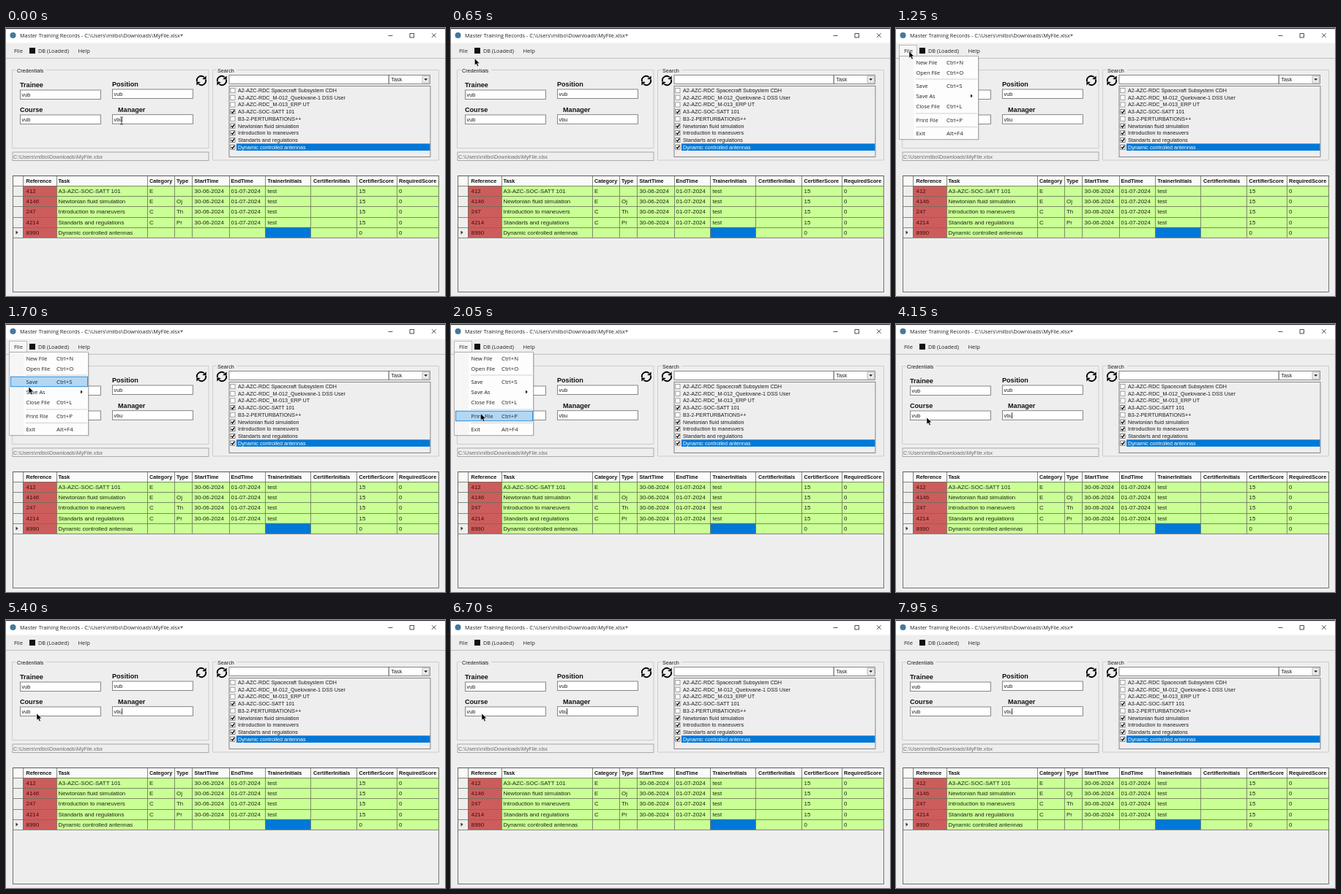
Write an HTML page that moves like this. It is 600 by 367 pixels and loops after 8 s.

```html
<!DOCTYPE html>
<html lang="en">
<head>
<meta charset="utf-8">
<title>Master Training Records</title>
<style>
html, body { margin: 0; width: 100%; height: 100%; overflow: hidden; background: #efeeef; }
svg { display: block; width: 600px; height: 367px; }
text { font-family: "Liberation Sans", Arial, sans-serif; white-space: pre; }
.ui { font-family: "Open Sans", "Noto Sans", sans-serif; }
.bold { font-weight: 700; }
</style>
</head>
<body>
<svg id="stage" viewBox="0 0 600 367" xmlns="http://www.w3.org/2000/svg"></svg>
<script>
const PATH = 'C:\\Users\\milbo\\Downloads\\MyFile.xlsx';
const BLUE = '#0078d7', FORM = '#efeeef', EDGE = '#6c6c6c';

const rect = (x, y, w, h, fill, stroke = 'none', extra = '') =>
  `<rect x="${x}" y="${y}" width="${w}" height="${h}" fill="${fill}" stroke="${stroke}" stroke-width=".8" ${extra}/>`;
const text = (x, y, s, size, fill = '#1c1c1c', cls = '') =>
  `<text x="${x}" y="${y}" font-size="${size}" fill="${fill}" class="${cls}">${s}</text>`;
const path = (d, stroke, width = .8, fill = 'none') =>
  `<path d="${d}" stroke="${stroke}" stroke-width="${width}" fill="${fill}"/>`;

function titleAndMenuBar() {
  return rect(0, 0, 600, 20.5, '#fff') + rect(0, 0, 600, 1.2, '#2b2b33') +
    '<circle cx="9.5" cy="10" r="4" fill="#44789c"/>' +
    text(19, 13, `Master Training Records - ${PATH}*`, 7.3, '#222', 'ui') +
    path('M522.5 10.5h6M552 7.5h5.5v5.5h-5.5zM582 7.3l5.6 5.6M587.6 7.3l-5.6 5.6', '#222') +
    rect(32, 27, 8, 8, '#111') +
    text(44, 33.5, 'DB (Loaded)', 7.35, '#222', 'ui') +
    text(98.5, 33.5, 'Help', 7.6, '#222', 'ui') +
    path('M0 41.5H600', '#b4b4b4');
}

function group(x, y, w, h, caption, captionWidth) {
  return path(`M${x + 5} ${y}H${x}V${y + h}H${x + w}V${y}H${x + captionWidth + 8}`, '#c4c4c4') +
    text(x + 6.5, y + 3.3, caption, 7.2);
}

function field(x, y, labelX, label, value) {
  return text(labelX, y - 3.6, label, 9.1, '#111', 'bold') +
    rect(x, y, 110, 12.5, '#fff', EDGE) +
    text(x + 2, y + 9, value, 7.3);
}

function refreshIcon(x, y) {
  const half = path('M-6 1.2A6 6 0 0 1 3.6 -4.8', '#000', 1.9) +
    path('M6.6 -6.6V-1.4L1.2 -2Z', 'none', 0, '#000');
  return `<g transform="translate(${x} ${y})">${half}<g transform="rotate(180)">${half}</g></g>`;
}

function credentials() {
  return group(8.5, 57.5, 268.5, 107, 'Credentials', 38) +
    field(19.5, 85, 19, 'Trainee', 'vub') + field(145.5, 84, 145, 'Position', 'vub') +
    field(19.5, 119, 19, 'Course', 'vub') + field(145.5, 118.7, 153, 'Manager', 'vbu') +
    refreshIcon(267, 72) +
    rect(9, 170, 268, 11.5, FORM, '#999') + text(10, 178.5, PATH, 7.2, '#6d6d6d');
}

function search() {
  const items = [
    'A2-AZC-RDC Spacecraft Subsystem CDH', 'A2-AZC-RDC_M-012_Quelovane-1 DSS User',
    'A2-AZC-RDC_M-013_ERP UT', 'A3-AZC-SOC-SATT 101', 'B3-2-PERTURBATIONS++',
    'Newtonian fluid simulation', 'Introduction to maneuvers',
    'Standarts and regulations', 'Dynamic controlled antennas'];
  const checked = [3, 5, 6, 7, 8];
  const rows = items.map((name, i) => {
    const y = 85.6 + i * 9.69, selected = i === 8, on = checked.includes(i);
    return (selected ? rect(315, y - 4.8, 264.5, 9.6, BLUE) : '') +
      rect(306.8, y - 3.1, 6.2, 6.2, '#fff', on ? '#666' : '#8c8c8c') +
      (on ? path(`M308 ${y}l1.6 1.8l2.6 -3.8`, '#000', 1.3) : '') +
      text(317, y + 2.5, name, 7.2, selected ? '#fff' : '#1c1c1c');
  });
  return group(282.5, 57.5, 309, 123.5, 'Search', 25) + refreshIcon(295, 72) +
    rect(305, 64.5, 218, 12, '#fff', EDGE) + rect(523.5, 64.5, 56, 12, '#fff', EDGE) +
    text(526.5, 73, 'Task', 7.2) + rect(569, 66, 9, 9, FORM, '#aaa') +
    path('M571.2 69.2h5l-2.5 2.8z', 'none', 0, '#222') +
    rect(305, 79.5, 275, 97, FORM, EDGE) + rows.join('');
}

function grid() {
  const edges = [9.5, 23.5, 69.5, 193.5, 230.5, 254.5, 305.5, 354.5, 416.5, 479.5, 534.5, 591.5];
  const textX = [27.5, 71.5, 196, 233, 257.5, 307.5, 357.5, 420, 482.5, 537];
  const heads = ['Reference', 'Task', 'Category', 'Type', 'StartTime', 'EndTime',
    'TrainerInitials', 'CertifierInitials', 'CertifierScore', 'RequiredScore'];
  const done = (id, task, category, type) =>
    [id, task, category, type, '30-06-2024', '01-07-2024', 'test', '', '15', '0'];
  const rows = [
    done('412', 'A3-AZC-SOC-SATT 101', 'E', ''),
    done('4146', 'Newtonian fluid simulation', 'E', 'Oj'),
    done('247', 'Introduction to maneuvers', 'C', 'Th'),
    done('4214', 'Standarts and regulations', 'C', 'Pr'),
    ['8990', 'Dynamic controlled antennas', '', '', '', '', '', '', '0', '0']];
  const top = 216, step = 14.2, bottom = top + 5 * step;
  const lines = edges.map(x => `M${x} 202.5V${bottom}`).join('') +
    [0, 1, 2, 3, 4, 5].map(i => `M9.5 ${Math.round(top + i * step) + .5}H591.5`).join('');
  return rect(9.5, 202.5, 582, 159, FORM, '#555') + rect(10, 203, 581, top - 203, '#fafafa') +
    rect(23, top, 46, bottom - top, '#cd5c5c') + rect(69, top, 522.5, bottom - top, '#caff96') +
    rect(354.5, bottom - step, 62, step, BLUE) +
    path(lines, '#66705a', .8) + path('M9 202.5H592', '#555') +
    path(`M13.5 ${bottom - 9.6}v5l3 -2.5z`, 'none', 0, '#333') +
    heads.map((s, c) => text(textX[c], 212.3, s, 7.2, '#111', 'bold')).join('') +
    rows.map((row, r) => row.map((s, c) =>
      s && text(textX[c], top + r * step + 10, s, 7.9, c ? '#1c2414' : '#3c1010')).join('')).join('');
}

const menuItems = [
  ['New File', 'Ctrl+N', 47], ['Open File', 'Ctrl+O', 61], ['Save', 'Ctrl+S', 79],
  ['Save As', '', 93], ['Close File', 'Ctrl+L', 107], ['Print File', 'Ctrl+P', 126],
  ['Exit', 'Alt+F4', 144]];

function dropdown() {
  return rect(6, 40, 108, 113.5, '#000', 'none', 'opacity=".12"') +
    rect(4.5, 38.5, 108, 114, '#fdfdfd', '#a0a0a0') + rect(5.2, 39.2, 19, 112.6, '#f6f6f6') +
    path('M27 70H111M27 117H111M27 135.5H111', '#c4c4c4') +
    rect(6.5, 0, 105, 13.6, '#b3d7f3', BLUE, 'id="highlight"') +
    menuItems.map(([name, key, y]) =>
      text(27.5, y + 2.8, name, 7.4, '#222', 'ui') + text(69, y + 2.8, key, 7.8, '#222', 'ui')).join('') +
    path('M102 90.5v5l2.8 -2.5z', 'none', 0, '#222');
}

const stage = document.getElementById('stage');
stage.innerHTML = rect(0, 0, 600, 367, FORM) + titleAndMenuBar() + credentials() + search() + grid() +
  rect(4.5, 23.5, 24, 15, '#b3d7f3', BLUE, 'id="fileButton"') + text(11, 33.5, 'File', 7.5, '#222', 'ui') +
  `<g id="menu">${dropdown()}</g>` +
  '<path id="caret" d="M158.5 121V129.5" stroke="#111" stroke-width=".8"/>' +
  '<path id="beam" d="M-2 -5Q0 -5 0 -4Q0 -5 2 -5M0 -4V4M-2 5Q0 5 0 4Q0 5 2 5" fill="none" stroke="#222" stroke-width=".9"/>' +
  '<path id="arrow" d="M0 0V9.2L2.1 7.3L3.6 10.8L5.3 10L3.8 6.8H6.7Z" fill="#000" stroke="#fff" stroke-width=".5"/>';

const part = id => document.getElementById(id);
const [fileButton, menu, highlight, caret, beam, arrow] =
  ['fileButton', 'menu', 'highlight', 'caret', 'beam', 'arrow'].map(part);
const show = (el, on) => el.setAttribute('visibility', on ? 'visible' : 'hidden');

// Pointer stops: time in ms, x, y
const stops = [[0, 158, 127], [50, 158, 127], [800, 18, 32], [1400, 18, 32], [1700, 31, 86],
  [2150, 42, 128], [7500, 42, 128], [7850, 60, 380], [8000, 60, 380]];

function pointer(t) {
  const i = stops.findIndex((s, n) => n > 0 && t < s[0]);
  const [t0, x0, y0] = stops[i - 1], [t1, x1, y1] = stops[i];
  const u = (t - t0) / (t1 - t0), k = u * u * (3 - 2 * u);
  return [x0 + (x1 - x0) * k, y0 + (y1 - y0) * k];
}

function draw(now) {
  const t = now % 8000, [x, y] = pointer(t);
  const open = t >= 900 && t < 2500;
  const overFile = x < 29 && y > 23 && y < 38;
  const overManager = x > 145 && y > 118 && y < 132;
  const hovered = menuItems.find(item => Math.abs(y - item[2]) <= 7.1);

  show(fileButton, open || overFile);
  fileButton.setAttribute('fill', open ? '#f6f6f6' : '#b3d7f3');
  fileButton.setAttribute('stroke', open ? '#b0b0b0' : BLUE);
  show(menu, open);
  show(highlight, open && hovered);
  if (hovered) highlight.setAttribute('y', hovered[2] - 6.8);
  show(caret, t >= 2500);
  show(beam, overManager);
  show(arrow, !overManager);
  for (const el of [beam, arrow]) el.setAttribute('transform', `translate(${x} ${y})`);
  requestAnimationFrame(draw);
}
requestAnimationFrame(draw);
</script>
</body>
</html>
```
